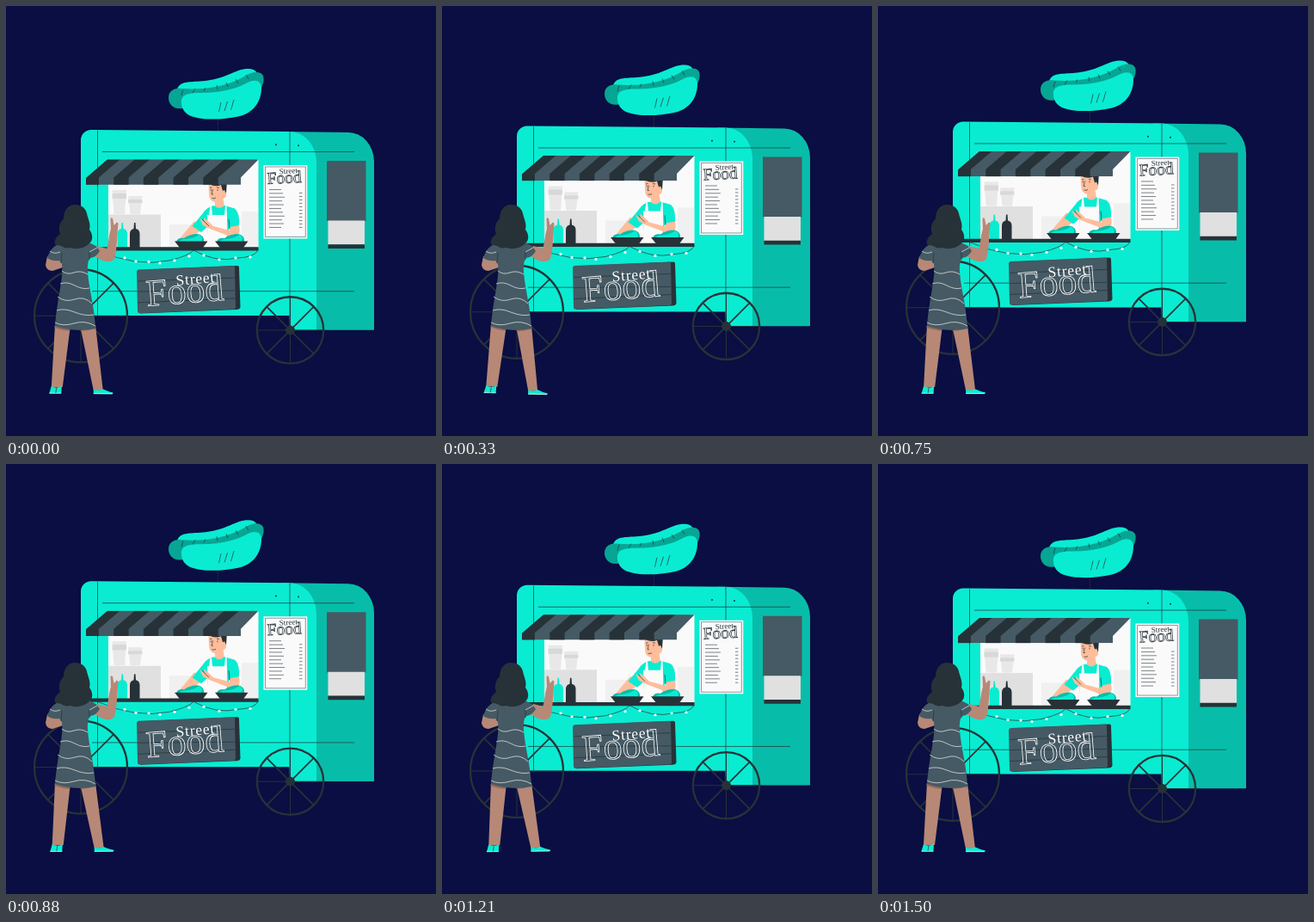
These frames come from a looping animation (500x500 px, 1540 ms). An HTML page:

```html
<!DOCTYPE html>
<html lang="en">
<head>
<meta charset="utf-8">
<title>Street food truck</title>
<style>
  html, body { margin: 0; width: 100%; height: 100%; overflow: hidden; background: #0a0e42; }
  svg { display: block; width: 100%; height: 100%; }
  text { font-family: "Liberation Serif", serif; }
  .teal { fill: #09ecd2; }
  .shade { fill: #07bda9; }
  .dark { fill: #263238; }
  .slate { fill: #455a64; }
  .grey { fill: #e0e0e0; }
  .white { fill: #fafafa; }
  .skin { fill: #ffbd9b; }
  .tan { fill: #b78876; }
  .line { fill: none; stroke: #263238; stroke-width: .7; }
  .chalk { fill: none; stroke: #fff; stroke-width: .8; }
</style>
</head>
<body>
<svg viewBox="0 0 500 500">
  <defs>
    <path id="bottle" d="M134.500 252H136L136.500 259Q141 260 141 265V281H129.500V265Q129.500 260 134 259Z"/>
    <g id="bowl">
      <path class="shade" d="M198 274Q200 269 207 270Q214 265 223 265Q231 267 230 274Z"/>
      <path class="teal" d="M201 274Q203 271 210 271Q219 270 224 266Q230 268 227 274Z"/>
      <path class="dark" d="M196 273.500H234.500L229 281H202Z"/>
    </g>
    <clipPath id="awningShape"><path d="M118 178.500H293.500L273 199.500V207.700H93V200Z"/></clipPath>
  </defs>

  <g id="truck">
    <!-- hot dog -->
    <path class="line" d="M246.300 128V146"/>
    <path class="teal" d="M199 97C202 86 216 89 232 87C258 84 266 73 282 73C291 73 294 79 291 84L270 100L204 108Z"/>
    <path fill="#07a594" d="M205 119C195 121 189 114 189 107C189 99 195 95 204 96C230 98 256 94 277 82C286 76 296 75 299 81C301 87 298 95 294 98L240 112Z"/>
    <path class="teal" d="M204 113C203 103 211 101 227 101C253 101 270 95 281 89C291 84 297 88 297 95C297 112 287 125 270 128.500C252 132.500 228 133 215 128C208 125 204 119 204 113Z"/>
    <path class="line" d="M250 112L247.500 123M257.500 111L254 122M265 109L261.500 121M206 97L204 104M220 96L217 101M232 95L230 99M245 92L246 97M256 89L258 94M267 85L270 90M279 80L282 85"/>

    <!-- body -->
    <path class="shade" d="M320 146L398 147A30 34 0 0 1 428 181V376.700H330Z"/>
    <path class="teal" d="M87 360V156A12 12 0 0 1 99 144L330 146A31 36 0 0 1 361 182V376.700H330V360Z"/>
    <path class="line" d="M106.500 145V360M330 146V376M112 169.500H405M100 331.700H405"/>
    <circle class="dark" cx="314" cy="161.300" r="1"/>
    <circle class="dark" cx="340" cy="162.200" r="1"/>
    <path class="slate" d="M373 180H418.500V250H373Z"/>
    <path class="grey" d="M374.500 249.500H417V277.500H374.500Z"/>
    <path class="dark" d="M374.500 277.300H417V282H374.500Z"/>

    <!-- serving window -->
    <path class="white" d="M119 195L293.500 178.500V281H119Z"/>
    <path fill="#f0f0f0" d="M190 254H215V281H190ZM274 239H293V281H274Z"/>
    <path class="grey" d="M119 242.500H180V281H119Z"/>
    <path fill="#e8e8e8" d="M123.500 214H140L138 242H125.500ZM142 221H158.500L156 242H144.500Z"/>
    <path fill="#d8d8d8" d="M123.500 218H140V224H123.500ZM142 225H158.500V229H142Z"/>
    <use href="#bottle" class="teal"/>
    <use href="#bottle" class="dark" x="14.500"/>

    <!-- cook -->
    <path class="skin" d="M235.500 204H256V219Q256 223 252.500 224L254 233Q248 239 243 234V228Q236 227 236 218Z"/>
    <path class="dark" d="M236 207Q244 211 250 208L252 215L254 214L256 218L257 203H236Z"/>
    <path class="line" d="M237 211.500L239.500 211M245 211L248 211.500M240.500 213L239 219H241M239.500 223.500Q242 224.500 244 223M238.300 213V215M246 213V215"/>
    <path class="skin" d="M219 250L230 259L212 271L200 274L204 268Z"/>
    <path class="teal" d="M242 232Q233 234 229 241L216.500 256L227 263L234 257V281H257L259 259L271 256Q272 240 266 235.500L254 232Q248 238 242 232Z"/>
    <path class="white" d="M236 243L237.500 233H239L240 243H254L255 232.500H256.500L257 244Q258 262 256 281H233Q235 260 234 243Z"/>
    <path class="skin" d="M260 257L271 255Q273 264 269 268Q264 271 258 267L237 259L229 255L225 247L231 251L230 246L235 250L241 256L260 261Z"/>
    <path class="line" d="M228 248L236 256M259 248L260 259"/>
    <use href="#bowl"/>
    <use href="#bowl" x="47"/>
    <path class="dark" d="M98 280.300H293.500V284.500H98Z"/>
    <g id="awning" clip-path="url(#awningShape)"></g>

    <!-- fairy lights -->
    <path class="line" d="M106 284Q151 304 190 296Q214 290 218 284Q244 299 270 293Q289 292 293 284"/>
    <g id="bulbs" fill="#fff"></g>

    <!-- menu -->
    <path class="white" d="M299.500 185H350.300V270.500H299.500Z"/>
    <path class="line" d="M301.500 187H348.300V268.500H301.500Z" stroke-opacity=".7"/>
    <text class="dark" font-size="9" x="318" y="195.500" transform="rotate(-4 318 195.500)">Street</text>
    <text class="line" font-size="19.500" x="304" y="207" transform="rotate(-3 304 207)">Food</text>
    <g id="menu" class="line" stroke-opacity=".85"></g>

    <!-- chalkboard -->
    <path class="dark" d="M155 307L269 302Q271 302 271 304L272.500 350Q272 353 268 353L156 357.500Z"/>
    <path class="slate" d="M154 306.500L264 302Q266 302 266 304L267 350Q267 352 265 352.500L155 357.300Q153 357 153 355L152 309Q152 307 154 306.500Z"/>
    <path class="line" d="M153 320L266 316M153 332L266 331M153 345L267 340"/>
    <text class="chalk" x="164" y="349" font-size="44" transform="rotate(-4.500 164 349)">Food</text>
    <text fill="#fff" x="198" y="325" font-size="17.500" letter-spacing=".8" transform="rotate(-5 198 325)">Street</text>
    <g id="wheels" fill="none" stroke="#263238"></g>
  </g>

  <!-- customer -->
  <g id="legs">
    <path class="tan" d="M57 370L75 371L66 443H53Z"/>
    <path class="tan" d="M86 371L104 371L113 447H102Z"/>
    <path fill="#9c6858" d="M57 371H75L74 378Q65 377 56.500 374ZM86 371H104V375Q95 378 87 378Z"/>
    <path class="teal" d="M53 442Q59 445 65 442L64.500 450.500H50.500Z"/>
    <path class="teal" d="M102 446Q109 448 113 445.500Q118 448 125 449.500L124 451H102Z"/>
    <path stroke="#fff" stroke-width=".7" d="M50.500 450.300H64.500M102 450.700H124"/>
    <path class="line" d="M59 444L58 450"/>
  </g>
  <path class="tan" d="M48 291L46 301Q47 308 54 308L66 304V294Z"/>
  <path class="tan" d="M101 289C110 297 121 300 126 294C129 285 129 270 130.500 253Q129 250 127.500 253L125.500 255L124 247Q122 245 121.500 248L122 259Q120 266 119.500 271L117.500 282L106 279Z"/>
  <path class="slate" d="M65 276C56 278 51 283 48 293Q54 297 62 296L65 300C67 317 60 337 57 372Q80 380 104 375C103 350 97 332 95 310Q94 297 98 293Q105 292 109 285Q105 277 95 275Z"/>
  <path class="line" d="M65 287L64 299M97 286L97 295"/>
  <path class="chalk" d="M65 308Q71 313 79 310T95 312M63 323Q71 320 80 325T97 328M60 338Q69 345 80 341T100 346M59 354Q68 351 80 356T102 359M57 368Q66 373 79 369T104 372M51 285Q56 289 63 286M97 286L106 281" stroke-opacity=".8"/>
  <path class="dark" d="M80 231C72 231 67 238 67 247C61 253 61 261 63 265C57 269 55 276 58 278C64 277 67 283 75 281C83 284 91 281 96 277C102 273 101 265 97 260C99 253 95 247 94 241C92 234 87 231 80 231Z"/>
</svg>
<script>
  const PERIOD = 1540;
  const byId = id => document.getElementById(id);
  const repeat = (n, draw) => Array.from({ length: n }, (_, i) => draw(i)).join('');

  byId('awning').innerHTML = '<path class="slate" d="M90 178h204v30h-204z"/>' + repeat(5, i => {
    const x = 90.5 + 34.7 * i;
    return `<path class="dark" d="M${x + 24.5} 178.5h17.4l-24.5 21v9h-17.4v-9z"/>`;
  });

  byId('bulbs').innerHTML = [[138, 293], [151, 297], [166, 297.5], [179, 299], [196, 296], [213, 291],
    [230, 290], [248, 295], [267, 293], [284, 292]]
    .map(([x, y]) => `<circle cx="${x}" cy="${y}" r="1.6"/>`).join('');

  byId('menu').innerHTML = repeat(11, i =>
    `<path d="M306 ${213.5 + 4.4 * i}h${14 + i * 7 % 5}M341 ${217.5 + 4 * i}h3.5"/>`);

  const wheel = (x, y, r, hub) => `<g transform="translate(${x} ${y})">
    <circle r="${r}" stroke-width="2.3"/><circle r="${hub}" fill="#263238"/>` +
    repeat(4, i => `<path d="M${-r} 0H${r}" transform="rotate(${45 * i})" stroke-width="${i % 2 ? 1.7 : 1}"/>`) + '</g>';
  byId('wheels').innerHTML = wheel(87, 360.3, 54, 4) + wheel(330.5, 377, 38.7, 5);

  // Triangle wave: 0 at phase 0, 1 at phase 0.5.
  const triangle = phase => 1 - Math.abs(1 - 2 * (phase - Math.floor(phase)));

  function frame() {
    const phase = (performance.now() % PERIOD + 45) / PERIOD;
    const rise = 10.5 * triangle(phase) - 0.6;
    const sway = 2.8 * triangle(phase + 0.25) - 1.4;
    byId('truck').setAttribute('transform', `translate(0 ${-rise})`);
    byId('legs').setAttribute('transform', `rotate(${sway} 80 372)`);
    requestAnimationFrame(frame);
  }
  frame();
</script>
</body>
</html>
```
